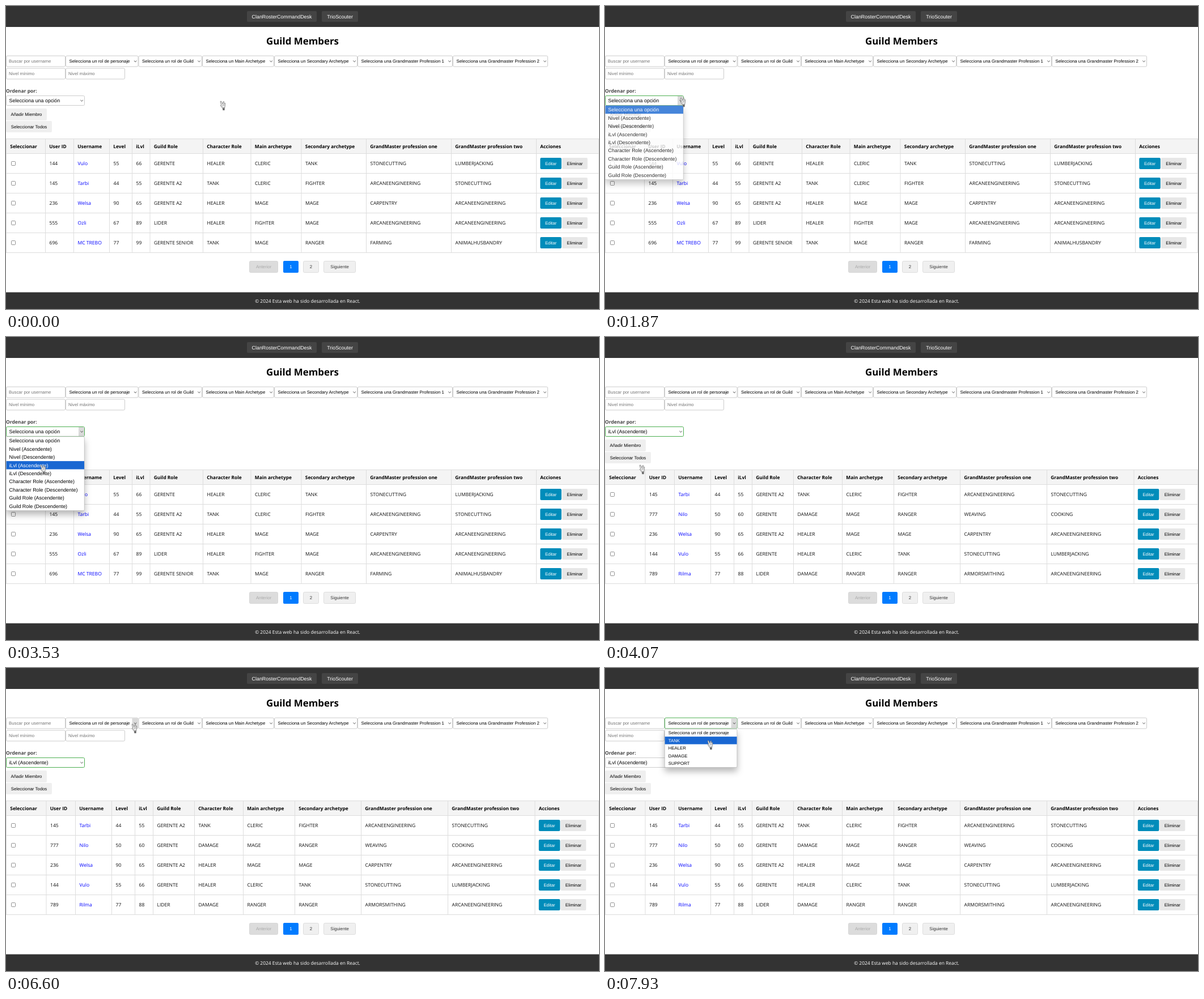
An HTML page that plays this animation: 1046x535 px, repeating every 8 s.

```html
<!DOCTYPE html>
<html lang="es">
<head>
<meta charset="utf-8">
<title>Guild Members</title>
<style>
  html, body { margin: 0; width: 100%; height: 100%; overflow: hidden; background: #fff; }
  svg { display: block; width: 1046px; height: 535px; }
  text { text-rendering: geometricPrecision; white-space: pre; }
  .form, .big, .nav { font-family: "Liberation Sans", Arial, sans-serif; font-size: 7.79px; }
  .big, .nav { font-size: 8.92px; }
  .cell, .head, .title, .label, .foot { font-family: "Open Sans", "Noto Sans", sans-serif; font-size: 8.55px; }
  .head { font-size: 8.36px; font-weight: 700; }
  .title { font-size: 16.9px; font-weight: 700; }
  .label { font-size: 8.5px; font-weight: 700; }
  .foot { font-size: 8.43px; }
  .shadow { filter: drop-shadow(0 7px 6px rgba(0, 0, 0, .28)); }
</style>
</head>
<body>
<svg id="stage" viewBox="0 0 1046 535"></svg>
<script>
const stage = document.getElementById('stage');

function add(parent, tag, attrs) {
  const node = document.createElementNS('http://www.w3.org/2000/svg', tag);
  for (const key in attrs) node.setAttribute(key, attrs[key]);
  return parent.appendChild(node);
}
const group = (parent = stage) => add(parent, 'g', {});
const show = (node, on) => node.setAttribute('visibility', on ? 'visible' : 'hidden');

// y is the middle of the capital letters
function label(parent, x, y, str, cls, fill = '#000', anchor = 'start') {
  const node = add(parent, 'text', { x, y, dy: '.36em', class: cls, fill, 'text-anchor': anchor });
  node.textContent = str;
  return node;
}
const box = (parent, x, y, width, height, fill, rx = 0) =>
  add(parent, 'rect', { x, y, width, height, fill, rx });

function frame(parent, x, y, w, h, fill, stroke, rx = 2) {
  const node = box(parent, x + .5, y + .5, w - 1, h - 1, fill, rx);
  node.setAttribute('stroke', stroke);
  return node;
}
function button(parent, x, y, w, h, str, fill, color, cls = 'form', stroke) {
  if (stroke) frame(parent, x, y, w, h, fill, stroke);
  else box(parent, x, y, w, h, fill, 2);
  label(parent, x + w / 2, y + h / 2, str, cls, color, 'middle');
}
function input(x, y, w, str) {
  frame(stage, x, y, w, 20, '#fff', '#ccc');
  label(stage, x + 5, y + 10, str, 'form', '#757575');
}
function select(x, y, w, h, str, cls, pad) {
  const border = frame(stage, x, y, w, h, '#fff', '#ccc');
  const arrow = box(stage, x + w - 11, y + 1, 10, h - 2, '#dadada');
  add(stage, 'path', {
    d: `M${x + w - 7.6} ${y + h / 2 - 1}l2.2 2.2l2.2 -2.2`,
    fill: 'none', stroke: '#333', 'stroke-width': .9
  });
  show(arrow, false);
  return { border, arrow, text: label(stage, x + pad, y + h / 2, str, cls) };
}

// header, title and footer
box(stage, 0, 0, 1046, 37, '#333');
button(stage, 425, 9, 123, 19, 'ClanRosterCommandDesk', '#444', '#fff', 'nav');
button(stage, 557, 9, 64, 19, 'TrioScouter', '#444', '#fff', 'nav');
label(stage, 523, 62, 'Guild Members', 'title', '#000', 'middle');
box(stage, 0, 505.5, 1046, 29.5, '#333');
label(stage, 532, 520.7, '© 2024 Esta web ha sido desarrollada en React.', 'foot', '#fff', 'middle');

// filters
input(0, 87.5, 105, 'Buscar por username');
input(0, 109.5, 105, 'Nivel mínimo');
input(105, 109.5, 105, 'Nivel máximo');
const filters = [
  [105, 'un rol de personaje'], [233.5, 'un rol de Guild'], [346, 'un Main Archetype'],
  [473, 'un Secondary Archetype'], [620, 'una Grandmaster Profession 1'],
  [788, 'una Grandmaster Profession 2'], [956]
];
const role = filters.slice(0, -1).map(([x, str], i) =>
  select(x, 87.5, filters[i + 1][0] - x, 20, 'Selecciona ' + str, 'form', 6.6))[0];

label(stage, 0, 150.3, 'Ordenar por:', 'label', '#444');
const order = select(0, 158, 139, 18, '', 'big', 5.6);
button(stage, 0, 181, 72, 21, 'Añadir Miembro', '#efefef', '#000');
button(stage, 0, 203, 81, 20, 'Seleccionar Todos', '#efefef', '#000');

// table
const heads = ['Seleccionar', 'User ID', 'Username', 'Level', 'iLvl', 'Guild Role', 'Character Role',
  'Main archetype', 'Secondary archetype', 'GrandMaster profession one',
  'GrandMaster profession two', 'Acciones'];

function table(cols, rows) {
  const g = group();
  box(g, 0, 234, 1046, 27, '#f4f4f4');
  const lines = [234, 260, 295, 330, 365, 400, 435].map(y => `M0 ${y + .5}H1046`)
    .concat([...cols, 1045].map(x => `M${x + .5} 234V436`));
  add(g, 'path', { d: lines.join(''), stroke: '#ddd', fill: 'none' });
  heads.forEach((str, i) => label(g, cols[i] + 7.3, 248, str, 'head'));
  rows.forEach((row, r) => {
    const y = 278 + r * 35;
    const x = cols[11] + 7.3;
    add(g, 'rect', { x: 9.5, y: y - 3.5, width: 7, height: 7, rx: 1, fill: '#fff', stroke: '#767676', 'stroke-width': .8 });
    row.split(',').forEach((str, i) =>
      label(g, cols[i + 1] + 7.5, y, str, 'cell', i === 1 ? '#00f' : '#111'));
    button(g, x, y - 10, 37.5, 20, 'Editar', '#008cba', '#fff');
    button(g, x + 38.5, y - 10, 45, 20, 'Eliminar', '#e7e7e7', '#000');
  });
  return g;
}
const vulo = 'GERENTE,HEALER,CLERIC,TANK,STONECUTTING,LUMBERJACKING';
const tarbi = '145,Tarbi,44,55,GERENTE A2,TANK,CLERIC,FIGHTER,ARCANEENGINEERING,STONECUTTING';
const welsa = '236,Welsa,90,65,GERENTE A2,HEALER,MAGE,MAGE,CARPENTRY,ARCANEENGINEERING';
const unsorted = table([0, 69, 119, 182, 222, 253.5, 347, 431.5, 520.5, 635, 785, 935], [
  '144,Vulo,55,66,' + vulo, tarbi, welsa,
  '555,Ozli,67,89,LIDER,HEALER,FIGHTER,MAGE,ARCANEENGINEERING,ARCANEENGINEERING',
  '696,MC TREBO,77,99,GERENTE SENIOR,TANK,MAGE,RANGER,FARMING,ANIMALHUSBANDRY'
]);
const sorted = table([0, 70.5, 122, 186, 227, 259, 332, 418, 509, 626, 779, 932.5], [
  tarbi, '777,Nilo,50,60,GERENTE,DAMAGE,MAGE,RANGER,WEAVING,COOKING', welsa,
  '144,Vulo,55,66,' + vulo,
  '789,Rilma,77,88,LIDER,DAMAGE,RANGER,RANGER,ARMORSMITHING,ARCANEENGINEERING'
]);

// pager
button(stage, 429, 450, 51, 21, 'Anterior', '#dcdcdc', '#aaa', 'form', '#d6d6d6');
button(stage, 489, 450, 27, 21, '1', '#007bff', '#fff');
button(stage, 524, 450, 28, 21, '2', '#f0f0f0', '#333', 'form', '#ddd');
button(stage, 560, 450, 57, 21, 'Siguiente', '#f0f0f0', '#333', 'form', '#ddd');

// drop-down lists
function popup(x, y, w, step, cls, pad, items) {
  const g = group();
  const h = items.length * step + .8;
  const back = add(g, 'rect', { x: x + .3, y, width: w, height: h, rx: 2, fill: '#fff', stroke: '#b5b5b5', 'stroke-width': .7 });
  back.setAttribute('class', 'shadow');
  const bar = box(g, x + .6, y, w - .6, step, '#1967d2');
  const texts = items.map((str, i) => label(g, x + pad, y + (i + .5) * step, str, cls));
  return (opacity, hotY) => {
    show(g, opacity > 0);
    g.setAttribute('opacity', opacity);
    const at = Math.max(0, Math.floor((hotY - y) / step));
    bar.setAttribute('y', y + at * step);
    texts.forEach((node, i) => node.setAttribute('fill', i === at ? '#fff' : '#000'));
  };
}
const sorts = ['Nivel', 'iLvl', 'Character Role', 'Guild Role']
  .flatMap(str => [str + ' (Ascendente)', str + ' (Descendente)']);
const orderList = popup(0, 175.8, 138, 14.44, 'big', 5.6, ['Selecciona una opción', ...sorts]);
const roleList = popup(105, 107.8, 127.6, 13.4, 'form', 6.8,
  ['Selecciona un rol de personaje', 'TANK', 'HEALER', 'DAMAGE', 'SUPPORT']);

// gauntlet pointer
const hand = group();
add(hand, 'path', {
  d: 'M1 1.5L2.6 1L5 6L6 2.5L7.2 1.2L7.6 5L9.8 4.6L9.4 9L8.8 12.5L4.4 13L1.2 8.6L2.8 8Z',
  fill: '#ededed', stroke: '#777', 'stroke-width': .8, 'stroke-linejoin': 'round'
});
add(hand, 'path', { d: 'M5 6.5L6 9.5M7.4 5.5L7.4 9M3.2 9L5 11', stroke: '#888', 'stroke-width': .7, fill: 'none' });
add(hand, 'path', { d: 'M5 13L8.8 12.6L8.4 17L5.6 17Z', fill: '#aaa', stroke: '#777', 'stroke-width': .6 });
box(hand, 5.8, 14, 2, 2.2, '#444');

// pointer path: tick, x, y
const path = [
  [0, 377, 167], [3, 377, 167], [4, 365, 158], [6, 365, 158], [13, 235, 146], [19, 131, 153],
  [22, 132, 161], [32, 132, 161], [41, 86, 187], [45, 68, 203], [53, 60, 225], [73, 60, 225],
  [75, 61, 234], [82, 214, 156], [88, 214, 156], [92, 133, 158], [97, 224, 100], [99, 221, 98],
  [114, 221, 98], [119, 180, 127]
];
function pointer(tick) {
  const i = Math.max(1, path.findIndex(key => key[0] >= tick));
  const [t0, x0, y0] = path[i - 1], [t1, x1, y1] = path[i];
  const p = (tick - t0) / (t1 - t0);
  return [x0 + (x1 - x0) * p, y0 + (y1 - y0) * p];
}

const RATE = 15 / 1000, LOOP = 8000;
const ORDER_OPEN = 25, ORDER_PICK = 61, ROLE_OPEN = 107;
const fade = (tick, start) => Math.min(1, Math.max(0, (tick - start + 1) / 5));

function render(ms) {
  const tick = Math.min(119, Math.floor((ms + 5) * RATE));
  const [x, y] = pointer(tick);
  const picked = tick >= ORDER_PICK;
  const roleOpen = tick >= ROLE_OPEN;

  hand.setAttribute('transform', `translate(${x} ${y})`);
  show(unsorted, !picked);
  show(sorted, picked);
  order.text.textContent = picked ? 'iLvl (Ascendente)' : 'Selecciona una opción';
  order.border.setAttribute('stroke', tick >= ORDER_OPEN && !roleOpen ? '#4caf50' : '#ccc');
  role.border.setAttribute('stroke', roleOpen ? '#4caf50' : '#ccc');
  show(order.arrow, (tick >= 18 && !picked) || (tick >= 91 && tick <= 93));
  show(role.arrow, tick >= 97);
  orderList(picked ? 0 : fade(tick, ORDER_OPEN), y + 1);
  roleList(fade(tick, ROLE_OPEN), y + 1);
}

const start = performance.now();
function loop() {
  render((performance.now() - start) % LOOP);
  requestAnimationFrame(loop);
}
loop();
</script>
</body>
</html>
```
